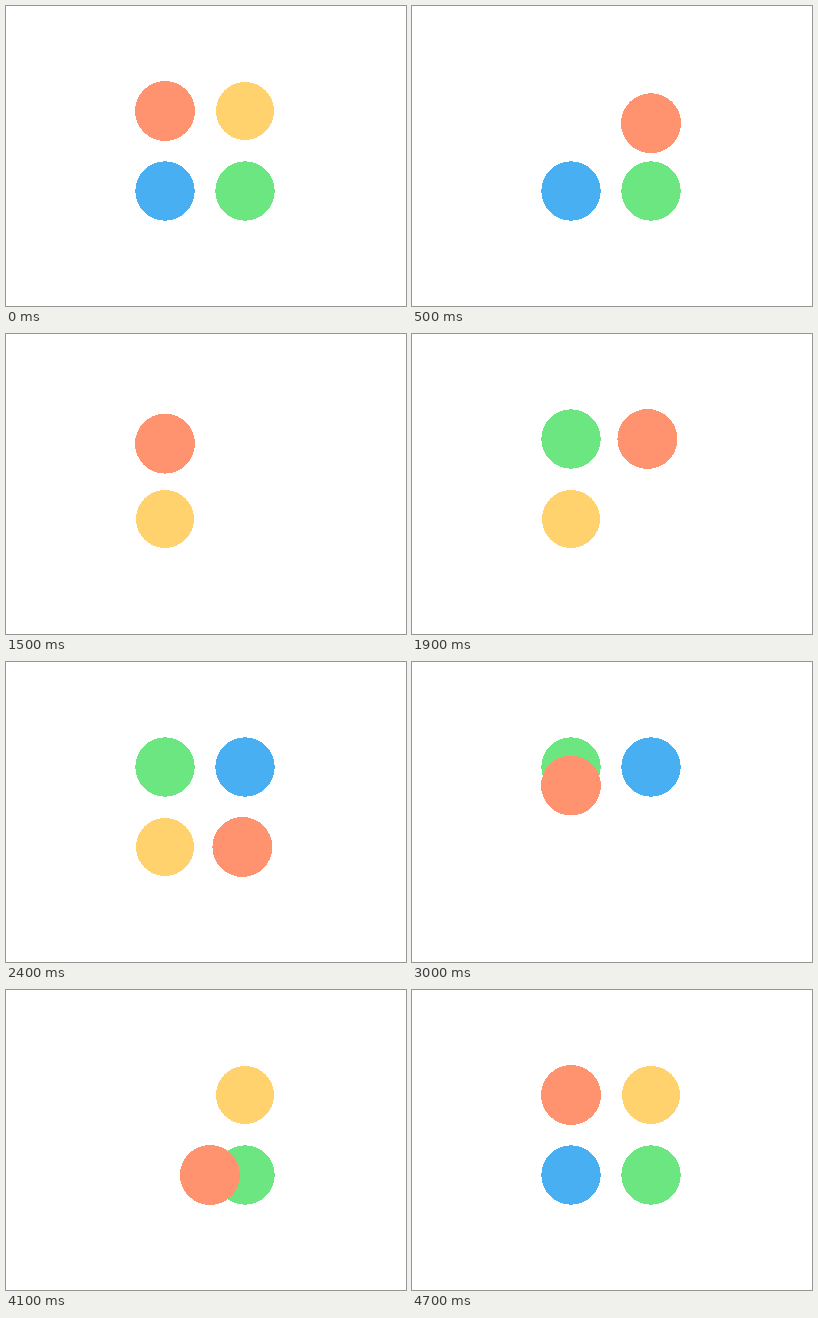
Write an HTML page that moves like this. It is 400x300 px and loops after 4.8 s.

```html
<!DOCTYPE html>
<html lang="en">
<head>
<meta charset="utf-8">
<title>Four dots</title>
<style>
  html, body { margin: 0; width: 100%; height: 100%; overflow: hidden; background: #fff; }
  svg { display: block; width: 400px; height: 300px; }
  circle { shape-rendering: crispEdges; }
</style>
</head>
<body>
<svg viewBox="0 0 400 300">
  <circle id="yellow" r="29" fill="#ffd26e"/>
  <circle id="green" r="29.7" fill="#6be681"/>
  <circle id="blue" r="29.7" fill="#48b0f2"/>
  <circle id="red" r="30" fill="#ff926f"/>
</svg>
<script>
const STEP = 100, COUNT = 48, SIDES = 12;

// Corners in travel order: top left, top right, bottom right, bottom left
const corners = [[159, 105], [239, 105], [239, 185], [159, 185]];

// Stays of each resting dot: [from side, to side, corner]
const stays = {
  yellow: [[0, 1, 1], [3, 7, 3], [9, 13, 1]],
  green: [[0, 2, 2], [4, 8, 0], [10, 13, 2]],
  blue: [[0, 3, 3], [5, 9, 1], [11, 13, 3]]
};

const dot = id => document.getElementById(id);
const ease = p => p < 0.5 ? 2 * p * p : 1 - 2 * (1 - p) * (1 - p);

function place(el, [x, y]) {
  el.setAttribute("cx", x);
  el.setAttribute("cy", y);
}

function draw(time) {
  const step = Math.floor(time / STEP) % COUNT;
  const s = SIDES * step / (COUNT - 1);
  const side = Math.floor(s);
  const from = corners[side % 4], to = corners[(side + 1) % 4];
  const e = ease(s - side);
  place(dot("red"), from.map((v, i) => v + (to[i] - v) * e));

  for (const id in stays) {
    const stay = stays[id].find(([a, b]) => s >= a && s < b);
    dot(id).style.display = stay ? "" : "none";
    if (stay) place(dot(id), corners[stay[2]]);
  }
}

const start = performance.now();
function tick() {
  draw(performance.now() - start);
  requestAnimationFrame(tick);
}
tick();
</script>
</body>
</html>
```
